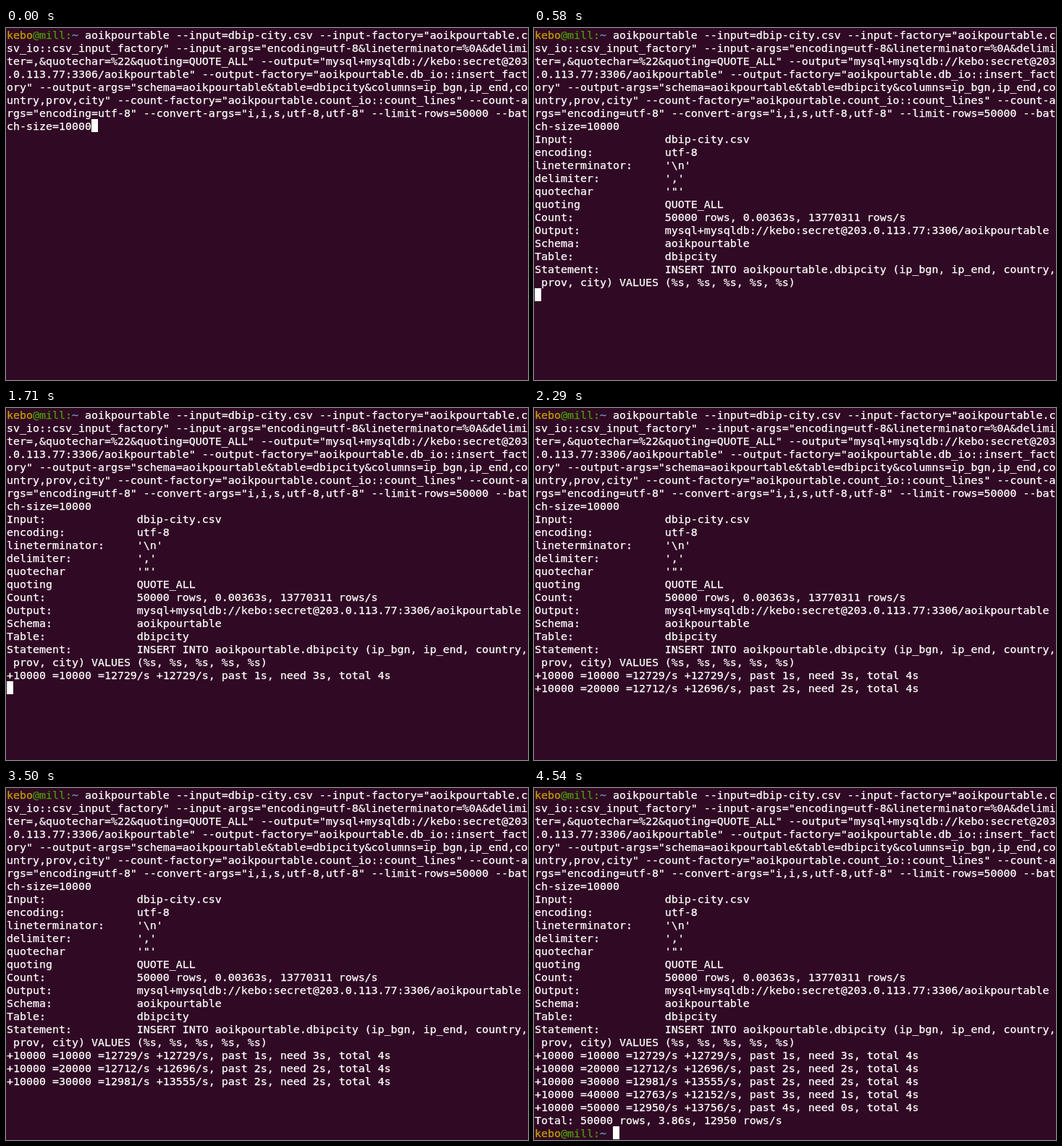
These frames come from a looping animation (721 px wide and 487 px high, 6 s). An HTML page:

```html
<!DOCTYPE html>
<html lang="en">
<head>
<meta charset="utf-8">
<title>Terminal</title>
<style>
  html, body { margin: 0; width: 100%; height: 100%; overflow: hidden; background: #300a24; }
  #screen {
    position: absolute; left: 1px; top: 1px;
    font: 14.95px/18px "DejaVu Sans Mono", monospace;
    font-variant-ligatures: none; color: #fff;
    -webkit-text-stroke: 0.25px;
  }
  #screen div { height: 18px; white-space: pre; }
  #cursor { position: absolute; width: 9px; height: 18px; background: #fff; }
  .user { color: #c4a000; }
  .host { color: #4e9a06; }
  .path { color: #729fcf; }
</style>
</head>
<body>
<div id="screen"></div>
<div id="cursor"></div>
<script>
const LOOP = 6000, COLS = 80, CELL_W = 9, CELL_H = 18;
const ENTER = 500, READY = 580, BATCH_START = 590, BATCH_LAG = 4, EXIT = 4540;
const BLINK_START = 1052, BLINK = 605;
const TOTAL = 50000, BATCH = 10000;

const screenEl = document.getElementById('screen');
const cursorEl = document.getElementById('cursor');

const promptParts = [['user', 'kebo'], ['host', '@mill:'], ['path', '~'], ['', ' ']];
const prompt = promptParts.map(([, part]) => part).join('');
const url = 'mysql+mysqldb://kebo:secret@203.0.113.77:3306/aoikpourtable';

const command = 'aoikpourtable --input=dbip-city.csv --input-factory="aoikpourtable.csv_io::csv_input_factory"' +
  ' --input-args="encoding=utf-8&lineterminator=%0A&delimiter=,&quotechar=%22&quoting=QUOTE_ALL"' +
  ` --output="${url}" --output-factory="aoikpourtable.db_io::insert_factory"` +
  ' --output-args="schema=aoikpourtable&table=dbipcity&columns=ip_bgn,ip_end,country,prov,city"' +
  ' --count-factory="aoikpourtable.count_io::count_lines" --count-args="encoding=utf-8"' +
  ` --convert-args="i,i,s,utf-8,utf-8" --limit-rows=${TOTAL} --batch-size=${BATCH}`;

const info = Object.entries({
  'Input:': 'dbip-city.csv',
  'encoding:': 'utf-8',
  'lineterminator:': "'\\n'",
  'delimiter:': "','",
  'quotechar': "'\"'",
  'quoting': 'QUOTE_ALL',
  'Count:': `${TOTAL} rows, 0.00363s, 13770311 rows/s`,
  'Output:': url,
  'Schema:': 'aoikpourtable',
  'Table:': 'dbipcity',
  'Statement:': 'INSERT INTO aoikpourtable.dbipcity (ip_bgn, ip_end, country, prov, city) VALUES (%s, %s, %s, %s, %s)',
}).map(([label, value]) => label.padEnd(20) + value + '\n').join('');

const events = [];
const print = (at, text) => events.push({ at, text });

print(0, prompt + command);
print(ENTER, '\n');
print(READY, info);

// Each batch is reported once its rows have been inserted at the given rate.
let done = 0, past = 0, average = 0, at = BATCH_START;
for (const rate of [12729, 12696, 13555, 12152, 13756]) {
  const seconds = BATCH / rate;
  done += BATCH;
  past += seconds;
  at += seconds * 1000 + BATCH_LAG;
  average = Math.floor(done / past + 1e-6);
  const need = (TOTAL - done) / average;
  print(at, `+${BATCH} =${done} =${average}/s +${rate}/s, past ${Math.round(past)}s, ` +
    `need ${Math.round(need)}s, total ${Math.round(past + need)}s\n`);
}
print(at, `Total: ${done} rows, ${past.toFixed(2)}s, ${average} rows/s\n`);
print(EXIT, prompt);

const wrap = line => line.match(new RegExp(`.{1,${COLS}}`, 'g')) || [''];

function makeRow(text) {
  const row = document.createElement('div');
  if (text.startsWith(prompt)) {
    for (const [cls, part] of promptParts) {
      const span = document.createElement('span');
      span.className = cls;
      span.textContent = part;
      row.append(span);
    }
    text = text.slice(prompt.length);
  }
  row.append(text);
  return row;
}

// The cursor blinks while the program runs and is solid at a waiting prompt.
function cursorOn(t) {
  return t < BLINK_START || t >= EXIT || Math.floor((t - BLINK_START) / BLINK) % 2 === 1;
}

const start = performance.now();
let shown = 0;
function draw() {
  const t = Math.max(0, performance.now() - start) % LOOP;
  const printed = events.filter(e => e.at <= t);
  if (printed.length !== shown) {
    shown = printed.length;
    const rows = printed.map(e => e.text).join('').split('\n').flatMap(wrap);
    screenEl.replaceChildren(...rows.map(makeRow));
    cursorEl.style.left = 1 + rows.at(-1).length * CELL_W + 'px';
    cursorEl.style.top = (rows.length - 1) * CELL_H + 'px';
  }
  cursorEl.hidden = !cursorOn(t);
  requestAnimationFrame(draw);
}
draw();
</script>
</body>
</html>
```
